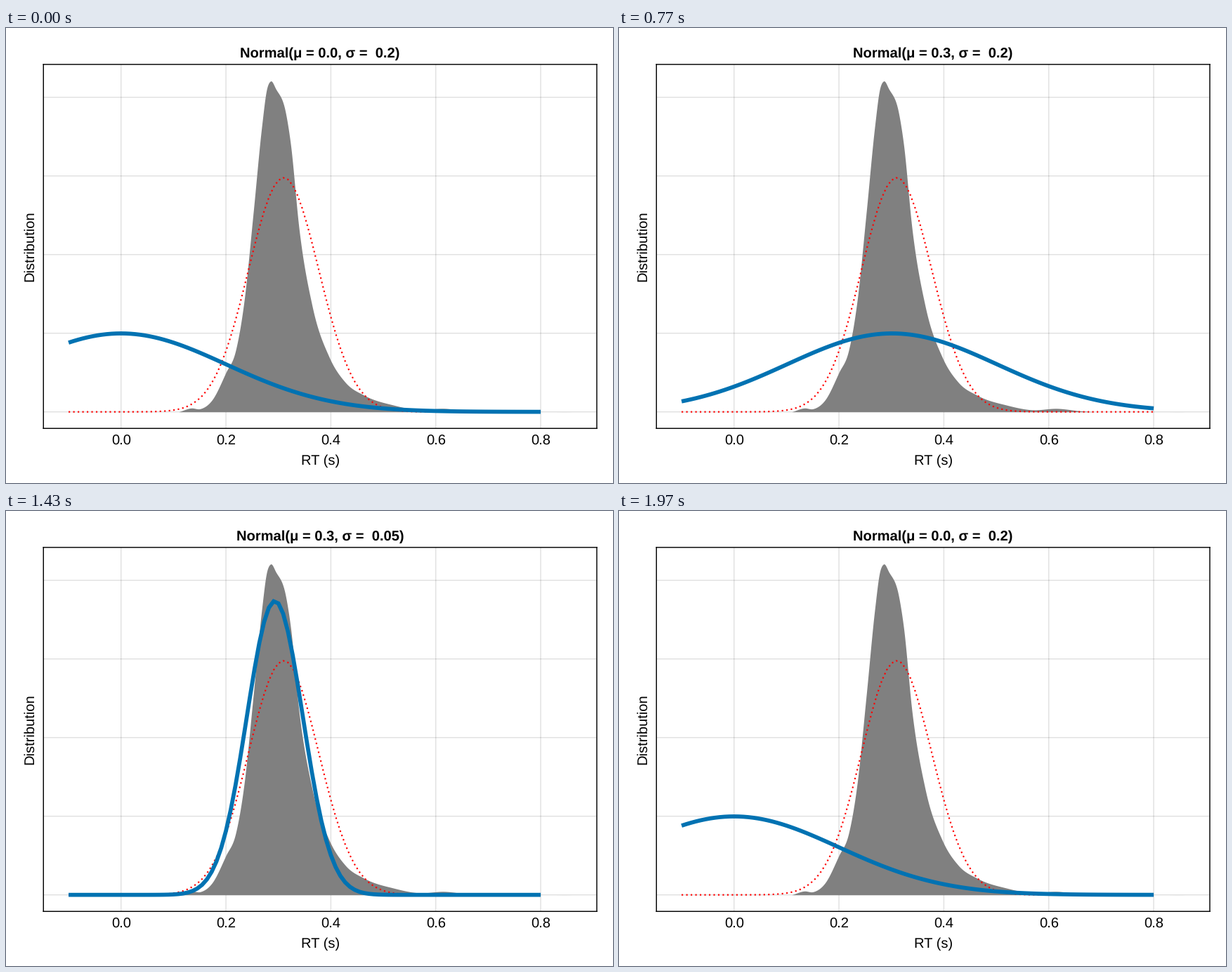
A matplotlib script for the animation above (2010 ms loop, 864 by 648 pixels).

```python
import numpy as np
import matplotlib.pyplot as plt
from matplotlib.animation import FuncAnimation

plt.rcParams["font.family"] = "Liberation Sans"
plt.rcParams["text.hinting"] = "none"

W, H = 864, 648
PT = 1.44                         # pixels per layout unit
FONT = 14 * PT
LEFT, RIGHT, TOP, BOTTOM = (PT * v for v in (37, 584, 36, 396))
MARGIN = 1 / 22                   # share of the axes left free at each side

X_UNIT, Y_UNIT = 746.6, 56.0      # pixels per data unit
X0 = LEFT + (RIGHT - LEFT) * MARGIN + 0.1 * X_UNIT
Y0 = BOTTOM - (BOTTOM - TOP) * MARGIN

STEPS = 60
TICK = 10                         # ms
LOOP = 2010                       # ms

# Key points of the observed density: pixel x, pixel height above the base
OUTLINE = [
    (246, 0), (264, 5.4), (276, 4.3), (293, 16.5), (313, 56), (327, 88),
    (339, 158), (352, 284), (364, 406), (371, 459), (376.5, 471), (384, 460),
    (398, 426), (405, 382), (417, 262), (436, 150), (460, 78), (483, 42),
    (510, 23.5), (552, 9.5), (587, 2.9), (624, 4.8), (655, 1.5), (805, 0),
]


def smooth(points, n=900):
    """Cubic Hermite curve through the points."""
    px, py = np.array(points).T
    slope = np.gradient(py, px)
    x = np.linspace(px[0], px[-1], n)
    i = np.clip(np.searchsorted(px, x, side="right") - 1, 0, len(px) - 2)
    h = px[i + 1] - px[i]
    s = (x - px[i]) / h
    y = (py[i] * (1 + 2 * s) * (1 - s) ** 2 + py[i + 1] * s * s * (3 - 2 * s)
         + h * s * (1 - s) * (slope[i] * (1 - s) - slope[i + 1] * s))
    return x, np.maximum(y, 0)


def normal(x, mu, sigma):
    return np.exp(-0.5 * ((x - mu) / sigma) ** 2) / (sigma * np.sqrt(2 * np.pi))


def ease(t, start, end, a, b):
    s = np.clip((t - start) / (end - start), 0, 1)
    return a + (b - a) * 0.5 * (1 - np.cos(np.pi * s))


def params(step):
    """Mean and spread of the moving curve; it rests between 0.6 and 0.7."""
    t = step / (STEPS - 1)
    if t < 0.2:
        return ease(t, 0, 0.2, 0, 0.5), 0.2
    if t < 0.7:
        return ease(t, 0.2, 0.4, 0.5, 0.3), ease(t, 0.4, 0.6, 0.2, 0.05)
    return ease(t, 0.7, 1, 0.3, 0), ease(t, 0.7, 1, 0.05, 0.2)


fig = plt.figure(figsize=(W / 72, H / 72), dpi=72, facecolor="white")
ax = fig.add_axes([LEFT / W, 1 - BOTTOM / H, (RIGHT - LEFT) / W, (BOTTOM - TOP) / H])
ax.set_xlim((LEFT - X0) / X_UNIT, (RIGHT - X0) / X_UNIT)
ax.set_ylim((Y0 - BOTTOM) / Y_UNIT, (Y0 - TOP) / Y_UNIT)
ax.set_xticks([])
ax.set_yticks([])
for spine in ax.spines.values():
    spine.set_linewidth(PT)
    spine.set_snap(False)


def label(x, y, text, **kw):
    return fig.text(x / W, 1 - y / H, text, fontsize=FONT, ha="center",
                    va="baseline", rotation_mode="anchor", **kw)


grid = dict(color="black", alpha=0.12, lw=PT, zorder=0, snap=False)
for v in np.arange(5) / 5:
    ax.axvline(v, **grid)
    ax.axhline(10 * v, **grid)
    label(X0 + v * X_UNIT, 594, f"{v:.1f}")

mid_x = (LEFT + RIGHT) / 2
label(mid_x, 622, "RT (s)")
label(39.4, (TOP + BOTTOM) / 2, "Distribution", rotation=90)
title = label(mid_x, 42, "", fontweight="bold")

dx, dy = smooth(OUTLINE)
ax.fill_between((dx - X0) / X_UNIT, dy / Y_UNIT, color="#808080", lw=0, zorder=1)

xs = np.linspace(-0.1, 0.8, 100)
ax.plot(xs, normal(xs, 0.31, 0.067), color="red", lw=1.5 * PT,
        ls=(0, (1, 2)), dash_capstyle="butt", zorder=3)
curve, = ax.plot(xs, xs, color="#0072B2", lw=4 * PT, solid_capstyle="butt",
                 solid_joinstyle="miter", zorder=4)


def update(i):
    # 30 steps per second, each start rounded to the 10 ms clock
    step = min(int((i + 0.5) * 0.3), STEPS - 1)
    mu, sigma = params(step)
    curve.set_ydata(normal(xs, mu, sigma))
    title.set_text(f"Normal(μ = {abs(mu):.1f}, σ =  {round(float(sigma), 2)})")
    return curve, title


anim = FuncAnimation(fig, update, frames=LOOP // TICK, interval=TICK,
                     repeat=True, repeat_delay=0)
plt.show()
```
